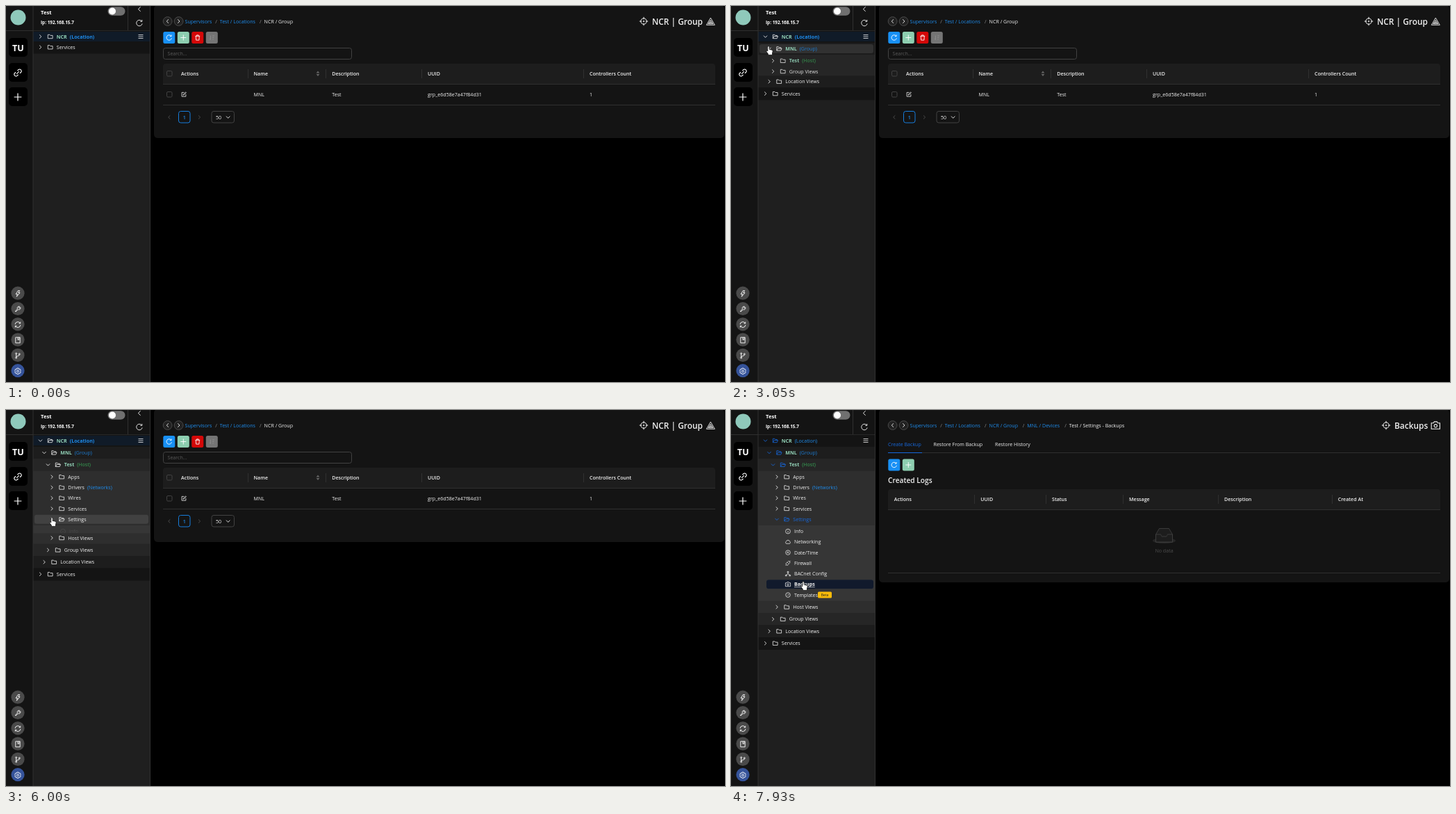
Animation, 1035 px wide and 541 px high, one loop 8 s. Source, as an HTML page with a canvas:

```html
<!DOCTYPE html>
<html lang="en">
<head>
<meta charset="utf-8">
<title>Device tree</title>
<style>
html, body { margin: 0; width: 100%; height: 100%; overflow: hidden; background: #000; }
canvas { display: block; }
</style>
</head>
<body>
<canvas id="stage" width="1035" height="541"></canvas>
<script>
const ctx = document.getElementById('stage').getContext('2d');
const LOOP = 8000, ROW = 15.25, GAP = 4.3, OPEN_MS = 300;
const PAGE_AT = 7520, SELECT_AT = 7585, PRESS_AT = 7310;
const WHITE = '#f0f0f0', BLUE = '#1e8bea', DEEP = '#1668dc', MINT = '#93d3b8', LINE = '#303030', PANEL = '#141414';
const LEVELS = ['#141414', '#1d1d1d', '#262626', '#2e2e2e', '#363636'];

const ring = (r, x = 0, y = 0) => `M${x - r} ${y}a${r} ${r} 0 1 0 ${2 * r} 0 ${r} ${r} 0 1 0 ${-2 * r} 0`;
const shapes = {
  chevron: 'M-1.4-2.7 1.4 0-1.4 2.7',
  reload: 'M2.9-2.3A3.7 3.7 0 1 0 3.6.8M3.3-4V-1.9H1.1',
  plus: 'M-4 0H4M0-4V4',
  folder: 'M-3.4-2.7H-.8L.2-1.6H3.4V2.7H-3.4Z',
  opened: 'M-3.4 2.7V-2.7H-.8L.2-1.6H2.6V-.4M-3.4 2.7-1.7-.4H3.9L2.5 2.7Z',
  trash: 'M-3.4-2.2H3.4M-1.3-2.2V-3.6H1.3V-2.2M-2.5-2.2-2.1 3.6H2.1L2.5-2.2',
  sort: 'M-2-3V3L-3.3 1.7M1-2.5H3.5M1 0H3M1 2.5H2.5',
  edit: 'M.2-2.9H-2.9V2.9H2.9V-.2M-.9.9-.6-.4 2.6-3.4 3.4-2.6.3.5Z',
  link: 'M-.5-2.2 1.2-3.7A2.1 2.1 0 0 1 3.9-1L2.3.6M.5 2.2-1.2 3.7A2.1 2.1 0 0 1-3.9 1L-2.3-.6M-1.4 1.4 1.4-1.4',
  bolt: 'M.3-4.3-2.8.6H-.5L-1.7 4.3 3-1.3H.7L2.7-4.3Z',
  wrench: 'M-3.8 3-.5-.3A2.5 2.5 0 0 1 2.6-3.8L1.3-2.2 2.2-1.3 3.8-2.6A2.5 2.5 0 0 1 .3.5L-3 3.8Z',
  sync: 'M-3.9-.4A3.9 3.9 0 0 1 3.4-2M3.9.4A3.9 3.9 0 0 1-3.4 2M3.7-4V-1.8H1.5M-3.7 4V1.8H-1.5',
  book: 'M-3.2-4H3.2V4H-3.2ZM0-4V-.4L1-1.2 2-.4V-4',
  branch: 'M-2.3-2V2M2.3-1.2C2.3 1-2.3 0-2.3 2' + ring(1, -2.3, -3) + ring(1, -2.3, 3) + ring(1, 2.3, -2.2),
  gear: 'M-1.2-4.2H1.2L1.7-2.9 3.3-2.9 4.3-.8 3.4 0 4.3.8 3.3 2.9 1.7 2.9 1.2 4.2H-1.2L-1.7 2.9-3.3 2.9-4.3.8-3.4 0-4.3-.8-3.3-2.9-1.7-2.9Z' + ring(1.5),
  aim: ring(4.2) + ring(.8) + 'M0-6.2V-2.8M0 6.2V2.8M-6.2 0H-2.8M6.2 0H2.8',
  pyramid: 'M0-5.3 6 5H-6ZM0-2.2 3.4 3.4H-3.4ZM0 .2V3.4M-3.4 3.4 0 .8 3.4 3.4',
  camera: 'M-3.6-2.1H-1.8L-1.2-3.2H1.2L1.8-2.1H3.6V2.9H-3.6Z' + ring(1.3, 0, .3),
  info: ring(3.4) + 'M0-.6V1.9M0-2V-1.4',
  cloud: 'M-2.2 2.4A1.7 1.7 0 0 1-2.4-.8 2.5 2.5 0 0 1 2.4-.8 1.7 1.7 0 0 1 2.2 2.4Z',
  clock: ring(3.3) + 'M0-2V.2L1.6 1M-1.8.2H0',
  plug: 'M-2.4 2.4A1.8 1.8 0 0 1-2.4-.2L-1.1-1.4 1.4 1.1.2 2.4A1.8 1.8 0 0 1-2.4 2.4ZL-3.5 3.5M3.5-3.5 2.3-2.3M-.4-2 .4-2.7A1.8 1.8 0 0 1 2.7-.4L2 .4',
  cluster: 'M0-1.6V0L-2.6 1.8M0 0 2.6 1.8M-.9-3.2H.9V-1.6H-.9ZM-3.6 1.8H-1.8V3.2H-3.6ZM1.8 1.8H3.6V3.2H1.8Z',
  gauge: ring(3.3) + 'M-.3.9 1.5-1.1M-2 .4H-1.6M0-2.2V-1.8',
  menu: 'M-3.5-2.5H3.5M-3.5 0H3.5M-3.5 2.5H3.5',
  hand: 'M-1.2.8Q-1.2-.3 0-.3T1.2.8V4.4L5 5.2Q6.3 5.6 6.2 7L5.5 10V12.4H-.6V11L-3 7.6Q-3.4 5.9-2 6.1L-1.2 7Z',
  arrow: 'M0 0V11L2.6 8.6 4.2 12.2 5.9 11.4 4.4 8H8Z'
};
for (const k in shapes) shapes[k] = new Path2D(shapes[k]);

const leaf = (label, icon, badge) => ({ label, icon, badge });
const dir = (label, tag, color, click, kids) => ({ label, tag, color, open: click + 52, kids });
const tree = [
  dir('NCR', '(Location)', BLUE, 1750, [
    dir('MNL', '(Group)', '#1c7bd0', 2780, [
      dir('Test', '(Host)', '#37a455', 4180, [
        dir('Apps'), dir('Drivers', '(Networks)', BLUE), dir('Wires'), dir('Services'),
        dir('Settings', '', '', 5860, [
          leaf('Info', 'info'), leaf('Networking', 'cloud'), leaf('Date/Time', 'clock'), leaf('Firewall', 'plug'),
          leaf('BACnet Config', 'cluster'), leaf('Backups', 'camera'), leaf('Templates', 'gauge', 'Beta')
        ]),
        dir('Host Views')
      ]),
      dir('Group Views')
    ]),
    dir('Location Views')
  ]),
  dir('Services')
];

// time, x, y of the pointer tip
const path = [
  [330, 895, 503], [1080, 88, 51], [1420, 51, 44], [2180, 51, 44], [2370, 49, 57], [2580, 54, 58], [3450, 54, 58],
  [3910, 58, 76], [4910, 58, 76], [5240, 78, 148], [5650, 66, 155], [6260, 66, 155], [7150, 104, 247]
];
const clicks = [1750, 2780, 4180, 5860, 7410];
let t = 0, mouse = null;

const clamp = v => Math.max(0, Math.min(1, v));
const smooth = v => v * v * (3 - 2 * v);
const cubic = v => v < .5 ? 4 * v ** 3 : 1 - 4 * (1 - v) ** 3;

function pointerAt(time) {
  if (time < path[0][0]) return null;
  const i = path.findIndex(k => k[0] > time);
  if (i < 0) return path[path.length - 1].slice(1);
  const a = path[i - 1], b = path[i], s = smooth((time - a[0]) / (b[0] - a[0]));
  return [a[1] + (b[1] - a[1]) * s, a[2] + (b[2] - a[2]) * s];
}

function text(s, x, y, color = WHITE, weight = 400, size = 7.1, align = 'left') {
  ctx.font = `${weight} ${size}px "Open Sans", "Noto Sans", sans-serif`;
  ctx.textAlign = align;
  ctx.fillStyle = color;
  ctx.fillText(s, x, y + size * .36);
  return ctx.measureText(s).width;
}
function rect(x, y, w, h, fill) {
  ctx.fillStyle = fill;
  ctx.fillRect(x, y, w, h);
}
function box(x, y, w, h, r, fill, stroke) {
  ctx.beginPath();
  ctx.roundRect(x, y, w, h, r);
  if (fill) { ctx.fillStyle = fill; ctx.fill(); }
  if (stroke) { ctx.strokeStyle = stroke; ctx.lineWidth = 1; ctx.stroke(); }
}
function disc(x, y, r, fill, stroke) {
  box(x - r, y - r, 2 * r, 2 * r, r, fill, stroke);
}
function icon(name, x, y, color = WHITE, scale = 1, width = .8, turn = 0, fill) {
  ctx.save();
  ctx.translate(x, y);
  ctx.rotate(turn);
  ctx.scale(scale, scale);
  if (fill) { ctx.fillStyle = fill; ctx.fill(shapes[name]); }
  ctx.strokeStyle = color;
  ctx.lineWidth = width;
  ctx.stroke(shapes[name]);
  ctx.restore();
}

const openness = n => n.kids ? cubic(clamp((t - n.open) / OPEN_MS)) : 0;
const heightOf = list => list.reduce((h, n) => {
  const p = openness(n);
  return h + ROW + (p && p * (heightOf(n.kids) + GAP));
}, 0);

function drawRow(n, level, y) {
  const x = 49.5 + 5.5 * level, chosen = t >= SELECT_AT;
  const hover = mouse && mouse[0] > 39 && mouse[0] < 207 && Math.abs(mouse[1] - y) < 6.6;
  if (n.label === 'NCR') {
    if (!chosen) rect(39, y - 7, 168, 14, '#101b28');
  } else if (hover) box(n.icon ? 51 : 41, y - 6.5, n.icon ? 154 : 164, 13, 3, 'rgba(255,255,255,.09)');

  if (n.icon) {
    const picked = n.label === 'Backups' && chosen;
    if (n.label === 'Backups' && t > PRESS_AT) {
      ctx.globalAlpha = clamp((t - PRESS_AT) / 300);
      box(51, y - 6.5, 154, 13, 3, '#111a2c');
      ctx.globalAlpha = 1;
    }
    icon(n.icon, 82, y, WHITE, 1, .75);
    const w = text(n.label, 91, y, WHITE, picked ? 700 : 400);
    if (hover) rect(91, y + 3.6, w, .7, WHITE);
    if (n.badge) {
      box(125, y - 4.5, 20, 9, 1.5, '#fbbc09');
      text(n.badge, 135, y, '#222', 400, 5.2, 'center');
    }
    return;
  }
  const p = openness(n), active = chosen && n.kids, tint = active ? DEEP : WHITE;
  icon('chevron', x, y, tint, .95, .9, p * Math.PI / 2);
  icon(p ? 'opened' : 'folder', x + 14.2, y, tint, 1, .8);
  const named = n.tag && n.kids;
  const w = text(n.label, x + 23.3, y, named ? MINT : active ? DEEP : WHITE, named ? 700 : 400);
  if (n.tag) text(n.tag, x + 27.3 + w, y, n.color, n.label === 'NCR' && !chosen ? 700 : 400);
  if (!level && n.kids) icon('menu', 194, 44);
}

function drawRows(list, level, y) {
  for (const n of list) {
    drawRow(n, level, y);
    const p = openness(n);
    if (p) {
      const h = heightOf(n.kids) + GAP / 2, top = y + ROW / 2 + GAP / 4;
      ctx.save();
      ctx.beginPath();
      ctx.rect(39, top, 168, h * p);
      ctx.clip();
      rect(39, top, 168, h, LEVELS[level + 1]);
      ctx.globalAlpha = p;
      drawRows(n.kids, level + 1, y + ROW + GAP / 2);
      ctx.restore();
      y += p * (h + GAP / 2);
    }
    y += ROW;
  }
}

function drawRail() {
  rect(0, 0, 39, 541, PANEL);
  disc(17.5, 16.5, 11, '#8fc9bb');
  rect(0, 35, 39, 1, LINE);
  for (const y of [46, 82, 117]) box(4, y, 27, 27, 5, '#000');
  text('TU', 17.3, 60.5, '#fff', 700, 12.6, 'center');
  icon('link', 17, 96, '#fff', 1.3, .9);
  icon('plus', 17, 131, '#fff', 1.35, .9);
  ['bolt', 'wrench', 'sync', 'book', 'branch', 'gear'].forEach((name, i) => {
    const y = 413.2 + i * 22.3;
    disc(17, y, 9.6, i === 5 ? '#35539a' : '#4a4a4a');
    icon(name, 17, y + .7, '#fff', 1, .9);
  });
}

function drawSidebar() {
  rect(39, 0, 169, 541, '#1f1f1f');
  rect(39, 0, 169, 35, PANEL);
  rect(39, 35, 169, 1, '#282828');
  rect(175, 0, 1, 35, LINE);
  text('Test', 50, 9, '#fff', 700, 7.7);
  text('Ip: 192.168.15.7', 50, 23.5, '#fff', 700, 6.4);
  box(146.5, 1.3, 25, 12.4, 6.2, '#707070');
  disc(153, 7.5, 5, '#fff');
  icon('chevron', 192, 4.5, WHITE, 1.2, .8, Math.PI);
  icon('reload', 192, 24.5, WHITE, 1.15, .8);
  rect(39, 36, 168, heightOf(tree) + 2, LEVELS[0]);
  drawRows(tree, 0, 44);
  rect(38.5, 0, 1, 541, LINE);
  rect(207, 0, 1, 541, LINE);
}

function drawCrumbs(items) {
  for (const [x, turn] of [[232.6, Math.PI], [248.6, 0]]) {
    disc(x, 22, 6.4, '#222', '#4a4a4a');
    icon('chevron', x, 22, WHITE, 1, .9, turn);
  }
  items.forEach(([x, label], i) => {
    const last = i === items.length - 1;
    text(label, x, 22, last ? WHITE : BLUE);
    if (!last) text('/', items[i + 1][0] - 6.5, 22, '#8a8a8a');
  });
}

function drawButtons(y, list) {
  list.forEach(([name, fill, color], i) => {
    const x = 226.3 + i * 20.5;
    box(x, y - 8.5, 17, 17, 2.5, fill);
    icon(name, x + 8.5, y, color || '#fff', 1, .9);
  });
}

function drawHeader(y, splits, cells) {
  box(226, y, 795, 29, [4, 4, 0, 0], '#1d1d1d');
  rect(226, y + 29, 795, 1, LINE);
  for (const x of splits) rect(x, y + 8, 1, 13, LINE);
  for (const [x, label] of cells) text(label, x, y + 14.3, WHITE, 600);
}

function drawTitle(label, x, mark) {
  const camera = mark === 'camera';
  icon('aim', x - 12, 22, WHITE, 1, 1);
  text(label, x, 22.5, WHITE, 600, 11.9);
  icon(mark, 1014.3, 22.3, WHITE, camera ? 1.7 : 1, camera ? .65 : .9);
}

const crumbs = [[257.5, 'Supervisors'], [307.7, 'Test / Locations'], [371.6, 'NCR / Group']];
const baseButtons = [['reload', '#1890f5'], ['plus', '#8dceb0']];

function drawGroupPage() {
  box(213, -1, 821, 191, 5, PANEL);
  drawCrumbs(crumbs);
  drawTitle('NCR | Group', 930, 'pyramid');
  drawButtons(45.5, [...baseButtons, ['trash', '#d40808'], ['sort', '#757575', '#929292']]);
  box(226.5, 60.5, 271, 16, 3, null, '#424242');
  text('Search...', 232.5, 68.5, '#5a5a5a');
  drawHeader(83, [348, 460, 598, 831],
    [[252, 'Actions'], [356.5, 'Name'], [469.3, 'Description'], [607, 'UUID'], [840, 'Controllers Count']]);
  ctx.fillStyle = '#666';
  ctx.fill(new Path2D('M449 93.5 451.4 96.5H446.6ZM449 101 451.4 98H446.6Z'));
  for (const y of [97.5, 127.5]) box(231.5, y - 4, 7.5, 7.5, 1.5, null, '#424242');
  icon('edit', 256, 127.3);
  [[356.5, 'MNL'], [469.3, 'Test'], [607, 'grp_e6d58e7a47f84d31'], [840, '1']].forEach(([x, s]) => text(s, x, 127.3));
  rect(226, 142, 795, 1, LINE);
  icon('chevron', 235, 160, '#555', .95, .9, Math.PI);
  box(248.5, 151.5, 16.5, 16.5, 3, null, '#177ddc');
  text('1', 256.7, 160, BLUE, 600, 7.1, 'center');
  icon('chevron', 278.3, 160, '#555', .95, .9);
  box(296, 151.5, 32.5, 16.5, 3, null, '#424242');
  text('50', 302, 160);
  icon('chevron', 319.7, 160, WHITE, 1, .9, Math.PI / 2);
}

function drawBackupPage() {
  box(213, -1, 821, 249, 5, PANEL);
  drawCrumbs([...crumbs, [426.3, 'MNL / Devices'], [486.8, 'Test / Settings - Backups']]);
  drawTitle('Backups', 955, 'camera');
  [[226, 'Create Backup', DEEP], [291.5, 'Restore From Backup'], [380, 'Restore History']]
    .forEach(([x, s, color]) => text(s, x, 49.7, color));
  rect(226, 61, 795, 1, LINE);
  rect(226, 61, 49, 1, DEEP);
  drawButtons(79, baseButtons);
  text('Created Logs', 226, 101.8, WHITE, 600, 10.2);
  drawHeader(114, [350, 453, 564, 701, 865],
    [[234.7, 'Actions'], [359.2, 'UUID'], [462, 'Status'], [573, 'Message'], [710, 'Description'], [873.7, 'Created At']]);
  ctx.fillStyle = '#262626';
  ctx.beginPath();
  ctx.ellipse(623.5, 188, 16.5, 4, 0, 0, 7);
  ctx.fill();
  ctx.strokeStyle = '#434343';
  ctx.lineWidth = .8;
  for (const d of ['M611.5 179 616.5 170.5H630.5L635.5 179V190H611.5Z',
    'M611.5 179H618.5C619.5 179 619 182 620.5 182H626.5C628 182 627.5 179 628.5 179H635.5V190H611.5Z']) {
    const p = new Path2D(d);
    ctx.fillStyle = '#1d1d1d';
    ctx.fill(p);
    ctx.stroke(p);
  }
  text('No data', 623.5, 202.3, '#4d4d4d', 400, 7.1, 'center');
  rect(226, 234, 795, 1, LINE);
}

function drawPointer() {
  if (!mouse) return;
  const [x, y] = mouse;
  if (clicks.some(c => t >= c && t < c + 130)) disc(x - .5, y, 6.5, 'rgba(210,190,20,.78)');
  icon(x < 208 ? 'hand' : 'arrow', x, y, '#111', 1, .8, 0, '#fff');
}

const start = performance.now();
function frame() {
  t = (performance.now() - start) % LOOP;
  mouse = pointerAt(t);
  rect(0, 0, 1035, 541, '#000');
  if (t < PAGE_AT) drawGroupPage();
  else drawBackupPage();
  drawRail();
  drawSidebar();
  drawPointer();
  requestAnimationFrame(frame);
}
frame();
</script>
</body>
</html>
```
